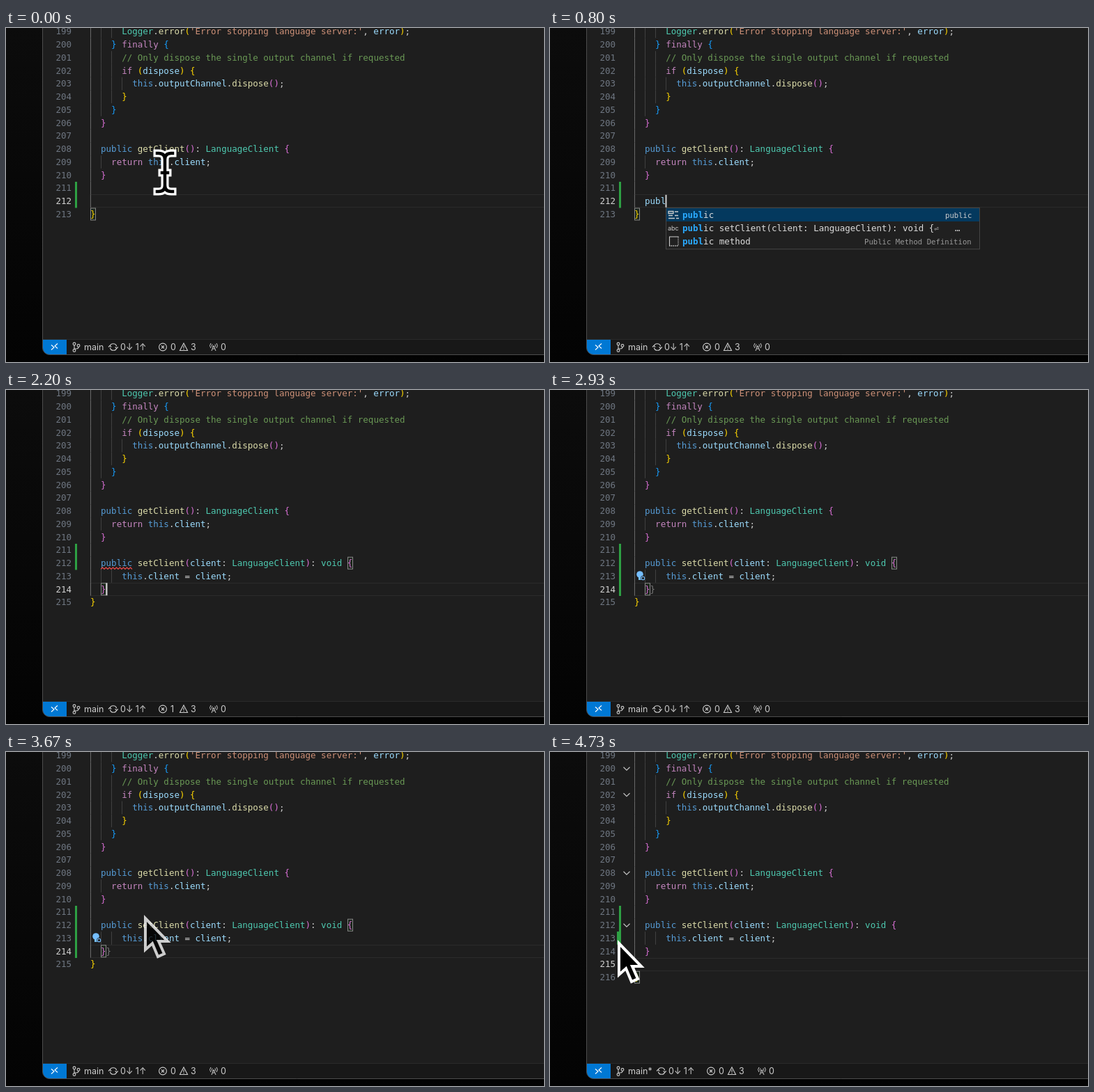
An HTML page with a canvas for the animation above (4.79 s loop, 772 px wide and 480 px high).

```html
<!DOCTYPE html>
<html>
<head>
<meta charset="utf-8">
<style>
html, body { margin: 0; overflow: hidden; background: #040404; }
canvas { display: block; }
</style>
</head>
<body>
<canvas id="stage" width="772" height="480"></canvas>
<script>
const ctx = document.getElementById('stage').getContext('2d');
const LOOP = 4790, COL = 7.525, ROW = 18.75, LEFT = 121, FIRST = 199;
const MONO = '12.5px "DejaVu Sans Mono", monospace';
const SMALL = '10.65px "DejaVu Sans Mono", monospace';
const SANS = '12.5px Inter, sans-serif';

// Event times in ms
const KEYS = [470, 540, 670, 730, 870, 1000, 1130];
const SUGGEST = 790, SNIPPET = 1200, ERROR = 1270, ACCEPT = 2000, SAVED = 2400,
      FIXED = 2530, GHOST = 2670, POINTER = 3530, ENTER = 4000, HOVER = 4330, DIRTY = 4400;
const POINTER_PATH = [[3530, 215, 248], [3670, 198, 234], [3870, 120, 242],
                      [4100, 10, 274], [4330, 78, 272], [4600, 97, 270]];

const HEAD = `
      Logger.error('Error stopping language server:', error);
    } finally {
      // Only dispose the single output channel if requested
      if (dispose) {
        this.outputChannel.dispose();
      }
    }
  }

  public getClient(): LanguageClient {
    return this.client;
  }
`.split('\n').slice(1);
const SETTER = [
  '  public setClient(client: LanguageClient): void {',
  '      this.client = client;',
  '  }'];

const BRACKETS = ['#ffd700', '#da70d6', '#179fff'];
const WORDS = {
  public: '#569cd6', this: '#569cd6', void: '#4ec9b0',
  return: '#c586c0', finally: '#c586c0', if: '#c586c0'
};

const rowY = n => 267.5 + (n - 213) * ROW;
const colX = c => LEFT + c * COL;

function text(s, x, y, color = '#cccccc', font = MONO) {
  ctx.font = font;
  ctx.fillStyle = color;
  ctx.fillText(s, x, y + 4.4);
}

function box(x, y, w, h, fill, stroke) {
  if (fill) { ctx.fillStyle = fill; ctx.fillRect(x, y, w, h); }
  if (stroke) { ctx.strokeStyle = stroke; ctx.lineWidth = 1; ctx.strokeRect(x, y, w, h); }
}

function path(d, color, width = 1.1, fill) {
  const p = new Path2D(d);
  if (fill) { ctx.fillStyle = fill; ctx.fill(p); }
  ctx.strokeStyle = color;
  ctx.lineWidth = width;
  ctx.stroke(p);
}

function dot(x, y, r, color, fill) {
  ctx.beginPath();
  ctx.arc(x, y, r, 0, 7);
  ctx.strokeStyle = ctx.fillStyle = color;
  ctx.lineWidth = 1.1;
  fill ? ctx.fill() : ctx.stroke();
}

function wordColor(word, next) {
  if (WORDS[word]) return WORDS[word];
  if (next === '(') return '#dcdcaa';
  return /^[A-Z]/.test(word) ? '#4ec9b0' : '#9cdcfe';
}

function drawCode(lines) {
  let depth = 3;
  lines.forEach((line, i) => {
    const y = rowY(FIRST + i);
    const indent = line ? line.search(/\S/) : 2;
    for (let c = 0; c < indent; c += 2)
      box(Math.round(colX(c)), y - ROW / 2, 1, ROW, c ? '#404040' : '#686868');
    for (const m of line.matchAll(/\/\/.*|'[^']*'|\w+|[^\s]/g)) {
      const s = m[0];
      let color = '#cccccc';
      if (s.startsWith('//')) color = '#6a9955';
      else if (s[0] === "'") color = '#ce9178';
      else if ('({'.includes(s)) color = BRACKETS[depth++ % 3];
      else if (')}'.includes(s)) color = BRACKETS[--depth % 3];
      else if (/\w/.test(s)) color = wordColor(s, line[m.index + s.length]);
      text(s, colX(m.index), y, color);
    }
  });
}

function matchBox(row, col) {
  box(Math.round(colX(col)) + .5, rowY(row) - 8.5, 7, 17, 'rgba(0,100,0,.1)', '#888888');
}

function abcIcon(x, y) {
  text('abc', x, y - 1, '#cccccc', '9px Inter, sans-serif');
}

function popup(x, rows) {
  box(x + .5, 258.5, 450, rows * 18.75 + 3, '#202020', '#454545');
  box(x + 1, 259, 449, rows > 1 ? 19 : 21, '#04395e');
}

function match(s, length, x, y) {
  text(s.slice(0, length), x, y, '#2aaaff', 'bold ' + MONO);
  text(s.slice(length), x + length * COL, y, '#dddddd');
}

function snippetRow(x, y, length) {
  abcIcon(x + 3, y);
  match('public setClient(client: LanguageClient): void {', length, x + 24, y);
  text('⏎', x + 24 + 48 * COL, y, '#dddddd', SMALL);
  text('…', x + 415, y);
}

function keywordPopup(length) {
  popup(166, 3);
  const [a, b, c] = [268.5, 287.5, 306.5];
  path('M170 263.5h7v3h-7zM179 264h5M170 269.5h6M179 269.5h5M170 273.5h9M181 273.5h4', '#cccccc', 1.3);
  match('public', length, 190, a);
  text('public', 567, a, '#cccccc', SMALL);
  snippetRow(166, b, length);
  ctx.setLineDash([1.5, 1.2]);
  path('M184 300v13', '#cccccc');
  path('M171 313h13', '#cccccc', 1.5);
  ctx.setLineDash([]);
  path('M171.5 313v-13h13', '#cccccc');
  match('public method', length, 190, c);
  text('Public Method Definition', 451, c, '#999999', SMALL);
}

function drawStatus(errors, dirty) {
  const gray = '#cccccc', y = 458.5;
  box(52, 448, 720, 22, '#181818');
  box(52, 447, 720, 1, '#2b2b2b');
  box(52, 448, 35, 22, '#0078d4');
  path('M65 455.5l4 3.5l-4 3.5M74 453.5l-4 3.5l4 3.5', '#ffffff');
  dot(98, 454, 1.9, gray);
  dot(104, 456.5, 1.9, gray);
  dot(98, 463.5, 1.9, gray);
  path('M98 456v5.5M104 458.5q0 2.5 -3 2.5h-3', gray);
  text(dirty ? 'main*' : 'main', 112, y, gray, SANS);
  ctx.save();
  ctx.translate(dirty ? 6 : 0, 0);
  path('M149 457.5a5 5 0 0 1 9.7 0M159 459.5a5 5 0 0 1 -9.7 0M147 458.5l2 -2l2.2 2M156.6 458.5l2.2 2l2 -2', gray);
  text('0↓ 1↑', 164, y, gray, SANS);
  dot(225, y, 5.4, gray);
  path('M223 456.5l4 4M227 456.5l-4 4', gray);
  text(errors, 236, y, gray, SANS);
  path('M255 453l5.5 10.5h-11zM255 456.5v3.5M255 461v1.2', gray);
  text('3', 265, y, gray, SANS);
  path('M294 453q-3 3.5 0 7M302 453q3 3.5 0 7M296 454.5q-1.5 2 0 4M300 454.5q1.5 2 0 4M298 456.5l-3 7.5M298 456.5l3 7.5M296.5 461h3', gray, 1);
  text('0', 308, y, gray, SANS);
  ctx.restore();
}

function drawIBeam() {
  const d = 'M217 180h2q9 0 9 9v37q0 9 -9 9h-2M239 180h-2q-9 0 -9 9v37q0 9 9 9h2M224 208h8';
  ctx.lineCap = 'square';
  path(d, '#ffffff', 11);
  path(d, '#000000', 4.5);
  ctx.lineCap = 'butt';
}

function drawPointer(t) {
  const i = Math.max(1, POINTER_PATH.findIndex(p => p[0] > t));
  const last = POINTER_PATH[POINTER_PATH.length - 1];
  let [, x, y] = last;
  if (t < last[0]) {
    const [t0, x0, y0] = POINTER_PATH[i - 1], [t1, x1, y1] = POINTER_PATH[i];
    const u = (t - t0) / (t1 - t0), k = u * u * (3 - 2 * u);
    x = x0 + (x1 - x0) * k;
    y = y0 + (y1 - y0) * k;
  }
  ctx.save();
  ctx.globalAlpha = Math.min(1, (t - POINTER) / 180);
  ctx.translate(x, y);
  path('M2 5V50L12 41L20 60L29 56L21 38H34Z', '#ffffff', 4, '#000000');
  ctx.restore();
}

function draw(t) {
  const accepted = t >= ACCEPT, entered = t >= ENTER;
  const typed = 'public '.slice(0, KEYS.filter(k => t >= k).length);
  const lines = [...HEAD, ...(accepted ? SETTER : ['']), ...(entered ? [''] : []), '}'];
  const current = entered ? 215 : accepted ? 214 : 212;
  const hasError = t >= ERROR && t < FIXED;

  const shade = ctx.createLinearGradient(0, 0, 0, 480);
  shade.addColorStop(0, '#0c0c0c');
  shade.addColorStop(1, '#030303');
  box(0, 0, 772, 480, shade);

  ctx.save();
  const frame = new Path2D('M780 -5H52.5V459.5a10 10 0 0 0 10 10H780Z');
  ctx.clip(frame);
  box(52, 0, 720, 480, '#1e1e1e');

  box(LEFT, Math.round(rowY(current) - ROW / 2) + .5, 660, 18, null, '#2b2b2b');
  lines.forEach((_, i) => {
    const n = FIRST + i;
    text(n, 71.5, rowY(n), n === current ? '#d0d0d0' : '#6e7681');
  });
  const changedTo = entered ? 215 : t >= SAVED ? 214 : 212;
  box(99, 221, 3, (changedTo - 210) * ROW, '#2ea043');
  if (t >= HOVER) {
    box(96, 258, 6, ROW, '#2ea043');
    for (const n of [200, 202, 208, 212])
      path(`M105.5 ${rowY(n) - 2}l4.5 4.5l4.5 -4.5`, '#c5c5c5');
  }

  if (entered) matchBox(216, 0);
  else if (accepted) { matchBox(212, 49); matchBox(214, 2); }
  else matchBox(213, 0);

  drawCode(lines);
  if (!accepted) text(typed, colX(2), rowY(212), '#9cdcfe');
  if (hasError) {
    let d = 'M136 257.5';
    for (let i = 0; i < (accepted ? 9 : 6); i++) d += 'l2.5 -2.5l2.5 2.5';
    path(d, '#f14c4c', 1.1);
  }
  if (t >= GHOST && !entered) {
    text('}', colX(3), rowY(214), '#7a7a7a');
    dot(129, 265, 4.8, '#75beff', true);
    box(127, 269, 4, 4, '#75beff');
    dot(133.5, 270.5, 3.4, '#1e1e1e', true);
    dot(133.5, 270.5, 2.3, '#75beff');
  }

  const since = entered ? ENTER : accepted ? ACCEPT : typed ? KEYS[typed.length - 1] : -500;
  const caretCol = entered ? 2 : accepted ? 3 : 2 + typed.length;
  if (Math.floor((t - since) / 500) % 2 === 0)
    box(Math.round(colX(caretCol)) - .5, rowY(current) - 9, 2, 18, '#d0d0d0');

  if (t >= SUGGEST && t < KEYS[6]) keywordPopup(typed.length);
  if (t >= SNIPPET && !accepted) {
    popup(189, 1);
    snippetRow(189, 268.5, 6);
  }
  drawStatus(hasError ? '1' : '0', t >= DIRTY);
  ctx.restore();
  path('M780 -5H52.5V459.5a10 10 0 0 0 10 10H780', '#4c4c4c', 1);

  if (t < 400) drawIBeam();
  if (t >= POINTER) drawPointer(t);
}

function tick() {
  draw(performance.now() % LOOP);
  requestAnimationFrame(tick);
}
tick();
</script>
</body>
</html>
```
